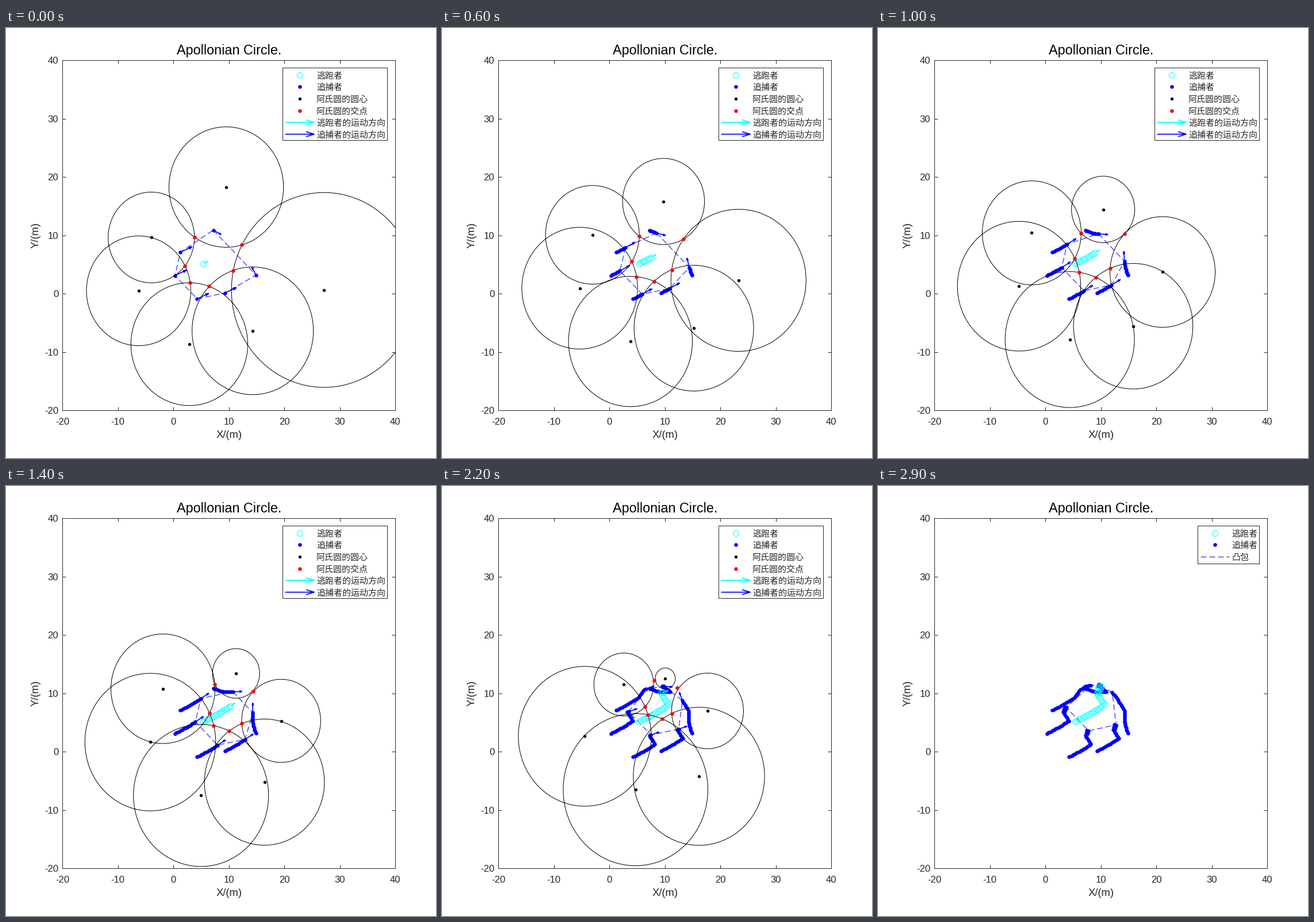
A matplotlib script that plays this animation: 748x748 px, repeating every 3.9 s.

```python
import numpy as np
import matplotlib.pyplot as plt
from matplotlib.animation import FuncAnimation
from matplotlib.patches import Rectangle

SIZE, DPI = 748, 64
PX = 72 / DPI                      # one pixel in points
NUDGE = 0.2                        # keeps snapped lines on their pixel
INK = "#262626"
RATIO = 0.75                       # pursuer speed / evader speed
EVADER_SPEED = 0.4
STEPS, FRAMES = 29, 39
GAP = np.array([np.nan, np.nan])


def unit(v):
    return v / np.hypot(*v)


def apollonian(evader, pursuers):
    k = 1 / (1 - RATIO ** 2)
    offset = pursuers - evader
    return evader + k * offset, RATIO * k * np.hypot(*offset.T)


def crossing(c1, r1, c2, r2, near):
    """Circle intersection closest to `near`; foot of the radical axis if apart."""
    d = np.hypot(*(c2 - c1))
    axis = (c2 - c1) / d
    a = (d * d + r1 * r1 - r2 * r2) / (2 * d)
    h = np.sqrt(max(r1 * r1 - a * a, 0))
    normal = np.array([-axis[1], axis[0]])
    options = [c1 + a * axis + s * h * normal for s in (1, -1)]
    return min(options, key=lambda p: np.hypot(*(p - near)))


def crossings(evader, pursuers):
    centers, radii = apollonian(evader, pursuers)
    return np.array([crossing(centers[i], radii[i], centers[(i + 1) % 6],
                              radii[(i + 1) % 6], evader) for i in range(6)])


def target_gap(step):
    """Gap 0 lies between pursuers 0 and 1, gap 5 between 5 and 0."""
    if step <= 15:
        return 0
    if step <= 21:
        return 5
    return 0 if step % 2 == 0 else 5


def simulate():
    evader = np.array([5.0, 5.0])
    pursuers = np.array([[7, 11], [15, 3], [9, 0], [4, -1], [0, 3], [1, 7]], float)
    states = []
    for step in range(STEPS):
        gap = target_gap(step)
        goal = crossings(evader, pursuers)[gap]
        heading = unit(goal - evader)
        moves = np.tile(RATIO * EVADER_SPEED * heading, (6, 1))
        for i in (gap, (gap + 1) % 6):
            moves[i] = min(0.29, 0.21 + 0.007 * step) * unit(goal - pursuers[i])
        evader = evader + EVADER_SPEED * heading
        pursuers = pursuers + moves
        states.append((evader, pursuers, heading, moves))
    return states


def arrow(tail, vec):
    tail, vec = np.asarray(tail, float), np.asarray(vec, float)
    tip = tail + vec
    side = np.array([-vec[1], vec[0]]) * 0.085
    back = tip - 0.28 * vec
    return np.array([tail, tip, GAP, back + side, tip, back - side, GAP])


states = simulate()
evader_path = np.array([s[0] for s in states])
pursuer_path = np.array([s[1] for s in states])

fig = plt.figure(figsize=(SIZE / DPI, SIZE / DPI), dpi=DPI, facecolor="white")
ax = fig.add_axes([(98 + NUDGE) / SIZE, 1 - (665 + NUDGE) / SIZE,
                   579 / SIZE, 609 / SIZE])
ax.set(xlim=(-20, 40), ylim=(-20, 40))
ax.set_xticks(range(-20, 41, 10), [])
ax.set_yticks(range(-20, 41, 10), [])
ax.tick_params(direction="in", top=True, right=True, length=6 * PX,
               width=PX, color=INK)
for spine in ax.spines.values():
    spine.set(linewidth=PX, color=INK)

page = fig.add_axes([0, 0, 1, 1])
page.set(xlim=(-NUDGE, SIZE - NUDGE), ylim=(SIZE - NUDGE, -NUDGE))
page.axis("off")


def label(x, y, text, size, ha="center", color=INK, font="Liberation Sans", **kw):
    return page.text(x, y, text, fontsize=size * PX, ha=ha, va="baseline",
                     color=color, family=font, **kw)


label(387.5, 46, "Apollonian Circle.", 23.33, color="black")
label(387.5, 713, "X/(m)", 18.33)
label(56, 360.5, "Y/(m)", 18.33, rotation=90, rotation_mode="anchor")
for value in range(-20, 41, 10):
    label(98 + (value + 20) * 9.65, 690, str(value), 16.67)
    label(91, 671 - (value + 20) * 10.15, str(value), 16.67, ha="right")

RING = dict(ls="", marker="o", ms=10 * PX, mfc="none", mec="cyan", mew=PX)
DASH = dict(color="blue", lw=PX, ls=(0, (10, 5)), dash_capstyle="butt")


def dot(color, size):
    return dict(ls="", marker="o", ms=size * PX, mfc=color, mec="none")


def stroke(color, width):
    return dict(color=color, lw=width * PX, solid_joinstyle="miter",
                solid_capstyle="butt")


BLUE_DOT, BLACK_DOT, RED_DOT = dot("blue", 6.5), dot("black", 5.4), dot("red", 6.5)


def legend(left, bottom, rows):
    items = [page.add_patch(Rectangle((left, 69), 663 - left, bottom - 69,
                                      fc="white", ec=INK, lw=PX))]
    for i, (text, kind, style) in enumerate(rows):
        y = 81.5 + 20.6 * i
        if kind == "dot":
            points = np.array([[left + 29.5, y]])
        elif kind == "arrow":
            points = arrow((left + 4.5, y), (50.5, 0))
        else:
            points = np.array([[left + 5, y], [left + 55, y]])
        items += page.plot(*points.T, **style)
        items.append(label(left + 59, y + 6, text, 15, ha="left", color=INK,
                           font="Noto Sans CJK JP"))
    return items


chase_legend = legend(481, 195, [
    ("逃跑者", "dot", RING),
    ("追捕者", "dot", BLUE_DOT),
    ("阿氏圆的圆心", "dot", BLACK_DOT),
    ("阿氏圆的交点", "dot", RED_DOT),
    ("逃跑者的运动方向", "arrow", stroke("cyan", 1.7)),
    ("追捕者的运动方向", "arrow", stroke("blue", 1.7)),
])
end_legend = legend(556, 135, [
    ("逃跑者", "dot", RING),
    ("追捕者", "dot", BLUE_DOT),
    ("凸包", "line", DASH),
])

hull, = ax.plot([], [], **DASH)
pursuer_trail, = ax.plot([], [], **BLUE_DOT)
evader_trail, = ax.plot([], [], **RING)
circles, = ax.plot([], [], **stroke("black", 1))
evader_arrow, = ax.plot([], [], **stroke("cyan", 1.5))
pursuer_arrows, = ax.plot([], [], **stroke("blue", 1.7))
center_dots, = ax.plot([], [], **BLACK_DOT)
crossing_dots, = ax.plot([], [], **RED_DOT)
chase_only = chase_legend + [circles, evader_arrow, pursuer_arrows,
                             center_dots, crossing_dots]
for marks in (pursuer_trail, evader_trail, center_dots, crossing_dots):
    marks.set_snap(False)

angle = np.linspace(0, 2 * np.pi, 181)
rim = np.column_stack([np.cos(angle), np.sin(angle)])


def update(frame):
    step = min(frame, STEPS - 1)
    finished = frame >= STEPS
    evader, pursuers, heading, moves = states[step]
    centers, radii = apollonian(evader, pursuers)

    evader_trail.set_data(*evader_path[:step + 1].T)
    pursuer_trail.set_data(*pursuer_path[:step + 1].reshape(-1, 2).T)
    hull.set_data(*np.vstack([pursuers, pursuers[:1]]).T)
    circles.set_data(*np.vstack([np.vstack([c + r * rim, GAP])
                                 for c, r in zip(centers, radii)]).T)
    center_dots.set_data(*centers.T)
    crossing_dots.set_data(*crossings(evader, pursuers).T)

    # The longest arrow follows the spread of the group.
    longest = 0.3 * np.hypot(*np.ptp(pursuers, axis=0)) / np.sqrt(6)
    scale = longest / np.hypot(*moves.T).max()
    pursuer_arrows.set_data(*np.vstack([arrow(p, m * scale)
                                        for p, m in zip(pursuers, moves)]).T)
    evader_arrow.set_data(*arrow(evader, 0.95 * heading).T)

    for artist in chase_only:
        artist.set_visible(not finished)
    for artist in end_legend:
        artist.set_visible(finished)
    return []


anim = FuncAnimation(fig, update, frames=FRAMES, interval=100,
                     repeat=True, repeat_delay=0, blit=False)
plt.show()
```
